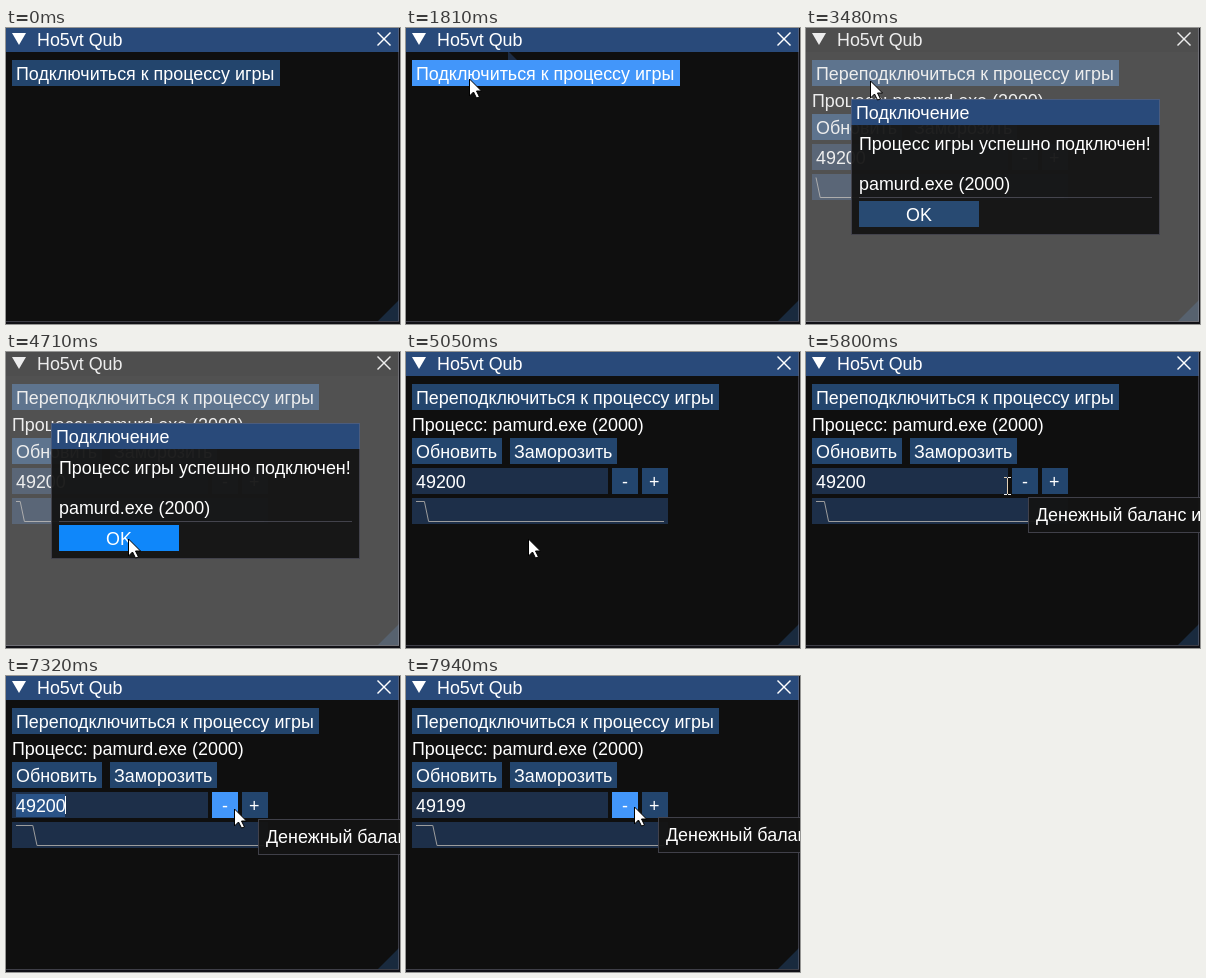
Animation of 394 by 296 pixels, one loop 8 s. Source, as an HTML page with a canvas:

```html
<!DOCTYPE html>
<html lang="ru">
<head>
<meta charset="utf-8">
<style>
html, body { margin: 0; width: 100%; height: 100%; overflow: hidden; background: #0f0f0f; }
canvas { display: block; }
</style>
</head>
<body>
<canvas id="stage" width="394" height="296"></canvas>
<script>
const ctx = document.getElementById('stage').getContext('2d');
const LOOP = 8000;
const FONT = '17.9px "Liberation Sans", Arial, sans-serif';
const WHITE = '#fff', BORDER = 'rgba(110,110,128,.5)';
const BUTTON = 'rgba(66,150,250,.4)', HOVER = '#4296fa', ACTIVE = '#0f87fa';
const FIELD = 'rgba(41,74,122,.54)', PANEL = 'rgba(20,20,20,.94)';
const TITLE = '#294a7a', TITLE_OFF = '#0a0a0a';
const APP = 'Ho5vt Qub', PROCESS = 'pamurd.exe (2000)';

// Moments of the interaction, ms
const ENTER = 1390, CONNECT = 2470, POPUP = 2540, OK_DOWN = 4640, CLOSE = 4780;
const SELECT = 6480, MINUS_DOWN = 7390, MINUS_UP = 7530;
const FIRST_SAMPLE = 3080, SAMPLE_GAP = 985, SAMPLE_STEP = 248 / 59;
const TIP_LAG = 70;

// Each move eases the pointer to a new place
const MOVES = [
  { from: ENTER, to: 1680, x: 63, y: 51 },
  { from: 3420, to: 4290, x: 122, y: 187 },
  { from: 5450, to: 5767, x: 201, y: 133 },
  { from: 5800, to: 6210, x: 157, y: 133 },
  { from: 6520, to: 7090, x: 228, y: 133 },
  { from: 7250, to: 7800, x: 228, y: 131 }
];

const clamp = k => Math.min(1, Math.max(0, k));
const ease = k => k * k * (3 - 2 * k);
const inside = (p, x, y, w, h) => p.x >= x && p.x < x + w && p.y >= y && p.y < y + h;
const overField = p => inside(p, 6, 116, 196, 26);
const overMinus = p => inside(p, 206, 116, 26, 26);

function pointer(t) {
  if (t < ENTER) return { x: -99, y: -99 };
  let x = 120, y = 2;
  for (const m of MOVES) {
    const k = ease(clamp((t - m.from) / (m.to - m.from)));
    x += (m.x - x) * k;
    y += (m.y - y) * k;
  }
  return { x: Math.round(x), y: Math.round(y) };
}

function rect(x, y, w, h, color) {
  ctx.fillStyle = color;
  ctx.fillRect(x, y, w, h);
}

function frame(x, y, w, h) {
  ctx.strokeStyle = BORDER;
  ctx.lineWidth = 1;
  ctx.strokeRect(x + .5, y + .5, w - 1, h - 1);
}

function text(s, x, y) {
  ctx.fillStyle = WHITE;
  ctx.fillText(s, x, y);
}

function trace(points) {
  ctx.beginPath();
  points.forEach(([x, y]) => ctx.lineTo(x, y));
}

function shape(points, color) {
  trace(points);
  ctx.fillStyle = color;
  ctx.fill();
}

function line(points, color, width = 1) {
  trace(points);
  ctx.strokeStyle = color;
  ctx.lineWidth = width;
  ctx.stroke();
}

function button(label, x, y, w, color = BUTTON) {
  rect(x, y, w, 26, color);
  text(label, Math.floor(x + (w - ctx.measureText(label).width) / 2), y + 20);
}

const buttonColor = (pressed, hot) => pressed ? ACTIVE : hot ? HOVER : BUTTON;

function drawWindow(modal) {
  rect(0, 0, 394, 296, '#111116');
  rect(0, 0, 393, 294, '#0f0f0f');
  rect(0, 0, 393, 24, modal ? TITLE_OFF : TITLE);
  shape([[6, 5], [20, 5], [13, 17]], WHITE);
  text(APP, 31, 18);
  for (const s of [-6.5, 6.5]) line([[378 - s, 4.5], [378 + s, 17.5]], WHITE, 1.4);
  shape([[393, 272], [393, 293], [372, 293]], 'rgba(66,150,250,.2)');
  rect(0, 293, 393, 1, BORDER);
  rect(392, 0, 1, 293, BORDER);
}

function drawPlot(t) {
  rect(6, 146, 256, 26, FIELD);
  const count = Math.floor((t - FIRST_SAMPLE) / SAMPLE_GAP);
  const knee = 10 + count * SAMPLE_STEP;
  const points = count < 0
    ? [[10, 169.5]]
    : [[10, 149.5], [knee, 149.5], [knee + SAMPLE_STEP, 169.5]];
  line([...points, [258, 169.5]], '#9c9c9c');
}

function drawPanel(t, p) {
  button('Переподключиться к процессу игры', 6, 32, 307);
  text('Процесс: ' + PROCESS, 6, 79);
  button('Обновить', 6, 86, 90);
  button('Заморозить', 104, 86, 107);

  rect(6, 116, 196, 26, FIELD);
  const value = t < MINUS_DOWN ? '49200' : '49199';
  const selected = t >= SELECT && t < MINUS_DOWN;
  const width = Math.floor(ctx.measureText(value).width);
  if (selected) rect(10, 118, width, 23, 'rgba(66,150,250,.35)');
  text(value, 10, 136);
  if (selected) rect(10 + width, 120, 1, 18, WHITE);

  const pressed = t >= MINUS_DOWN && t < MINUS_UP;
  button('-', 206, 116, 26, buttonColor(pressed, t >= CLOSE && overMinus(p)));
  button('+', 236, 116, 26);
  drawPlot(t);
}

function drawPopup(t, p) {
  const fade = clamp((t - POPUP - 3) / 167);
  rect(0, 0, 393, 294, `rgba(204,204,204,${.35 * fade})`);
  rect(45, 71, 309, 136, PANEL);
  rect(45, 71, 309, 26, TITLE);
  frame(45, 71, 309, 136);
  text('Подключение', 50, 91);
  text('Процесс игры успешно подключен!', 53, 122);
  text(PROCESS, 53, 162);
  rect(53, 169, 293, 1, BORDER);
  button('OK', 53, 173, 120, buttonColor(t >= OK_DOWN, inside(p, 53, 173, 120, 26)));
}

function drawTooltip(t) {
  const p = pointer(t - TIP_LAG);
  if (t < CLOSE || !(overField(p) || overMinus(p))) return;
  const x = p.x + 24, y = p.y + 10;
  rect(x, y, 217, 36, PANEL);
  frame(x, y, 217, 36);
  text('Денежный баланс игрока', x + 8, y + 24);
}

function drawArrow({ x, y }) {
  const points = [[0, 0], [0, 17], [4, 13], [7, 19], [10, 18], [7, 12], [12, 12], [0, 0]];
  ctx.save();
  ctx.translate(x + .5, y);
  shape(points, WHITE);
  line(points, '#000');
  ctx.restore();
}

// The text cursor inverts what lies below it
function drawBeam({ x, y }) {
  ctx.save();
  ctx.globalCompositeOperation = 'difference';
  rect(x, y - 7, 1, 16, WHITE);
  for (const end of [y - 8, y + 9]) {
    rect(x - 3, end, 3, 1, WHITE);
    rect(x + 1, end, 3, 1, WHITE);
  }
  ctx.restore();
}

function draw(t) {
  const p = pointer(t);
  const modal = t >= POPUP && t < CLOSE;
  ctx.font = FONT;
  drawWindow(modal);
  if (t < POPUP) {
    const hot = inside(p, 6, 32, 268, 26);
    button('Подключиться к процессу игры', 6, 32, 268, buttonColor(t >= CONNECT, hot));
    // Trail the pointer leaves under the title bar
    if (hot) shape([[102, 24], [103, 24], [111, 32], [102, 32]], '#1c2c45');
  } else {
    drawPanel(t, p);
  }
  if (modal) drawPopup(t, p);
  drawTooltip(t);
  if (t >= CLOSE && overField(p)) drawBeam(p);
  else drawArrow(p);
}

const start = performance.now();
function tick() {
  draw((performance.now() - start) % LOOP);
  requestAnimationFrame(tick);
}
tick();
</script>
</body>
</html>
```
